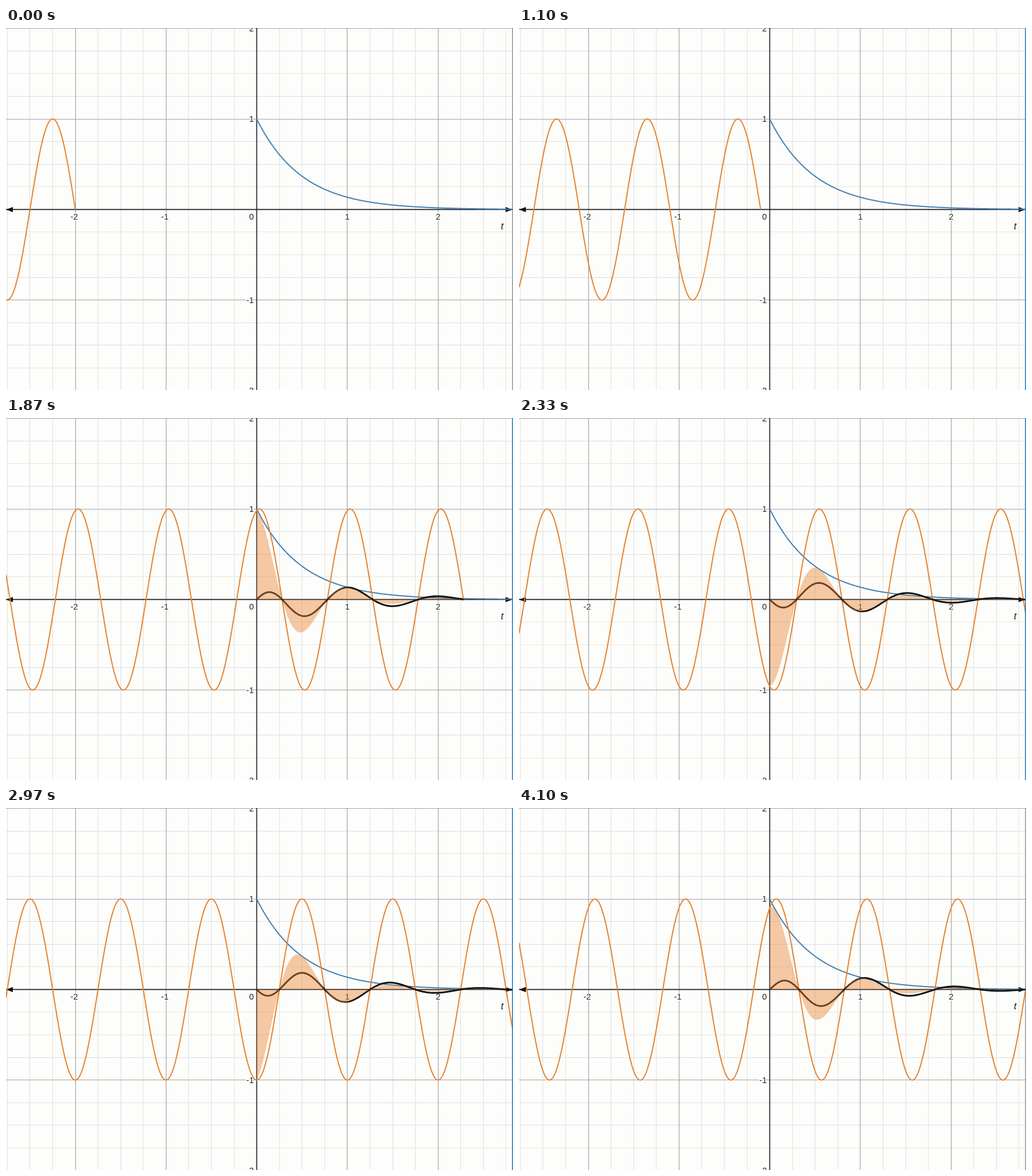
Recreate the animation shown at these times as an HTML page with a canvas. Size 885 by 633 pixels, loop 4.13 s.

```html
<!DOCTYPE html>
<html>
<head>
<meta charset="utf-8">
<style>
html, body { margin: 0; width: 885px; height: 633px; overflow: hidden; background: #fdfdfc; }
canvas { display: block; }
</style>
</head>
<body>
<canvas id="stage" width="885" height="633"></canvas>
<script>
const W = 885, H = 633, LOOP = 4130, STEPS = 124;
const X0 = 437.6, Y0 = 317.4, UNIT = 158.3;
const LEFT = -X0 / UNIT, RIGHT = (W - X0) / UNIT;
const ORANGE = '#e5822e';
const ctx = document.getElementById('stage').getContext('2d');

// [step, shift of the sine wave]
const KEYS = [[0, -2], [15, -2], [33, -0.1], [56, 2.28], [70, 3.797],
  [89, 5.75], [106, 7.698], [121, 9.322], [124, 9.322]];

const px = x => X0 + x * UNIT;
const py = y => Y0 - y * UNIT;

function shiftAt(step) {
  const i = KEYS.findIndex(k => k[0] > step);
  const [a, from] = KEYS[i - 1], [b, to] = KEYS[i];
  return from + (to - from) * (step - a) / (b - a);
}

function line(x1, y1, x2, y2, color, width = 1) {
  ctx.strokeStyle = color;
  ctx.lineWidth = width;
  ctx.beginPath();
  ctx.moveTo(x1, y1);
  ctx.lineTo(x2, y2);
  ctx.stroke();
}

function trace(f, a, b) {
  ctx.beginPath();
  for (let x = a; x < b; x += 0.006) ctx.lineTo(px(x), py(f(x)));
  ctx.lineTo(px(b), py(f(b)));
}

function curve(f, a, b, color, width) {
  if (b <= a) return;
  trace(f, a, b);
  ctx.strokeStyle = color;
  ctx.lineWidth = width;
  ctx.stroke();
}

function shade(f, a, b) {
  if (b <= a) return;
  trace(f, a, b);
  ctx.lineTo(px(b), Y0);
  ctx.lineTo(px(a), Y0);
  ctx.globalAlpha = 0.43;
  ctx.fillStyle = ORANGE;
  ctx.fill();
  ctx.globalAlpha = 1;
}

function label(text, x, y, align) {
  ctx.textAlign = align;
  ctx.strokeStyle = '#fdfdfc';
  ctx.lineWidth = 3;
  ctx.strokeText(text, x, y);
  ctx.fillStyle = '#222';
  ctx.fillText(text, x, y);
}

function arrow(tip, dir) {
  ctx.fillStyle = '#111';
  ctx.beginPath();
  ctx.moveTo(tip, Y0);
  ctx.lineTo(tip - 12 * dir, Y0 - 4.5);
  ctx.lineTo(tip - 12 * dir, Y0 + 4.5);
  ctx.fill();
}

function grid() {
  const snap = v => Math.floor(v) + 0.5;
  for (const major of [false, true]) {
    for (let i = -11; i <= 11; i++) {
      if ((i % 4 === 0) !== major) continue;
      const x = snap(px(i / 4)), y = snap(py(i / 4));
      line(x, 0, x, H, major ? '#969692' : i % 2 ? '#e0e0dc' : '#dcdce6');
      const warm = [1, -1, -2, 6, -7].includes(i);
      const minor = warm ? '#e7e8d2' : '#dadaea';
      line(0, y, W, y, !major ? minor : i === 4 ? '#a0a2b4' : '#a0a09c');
    }
  }
}

function axes() {
  line(0, Y0, W, Y0, '#181820', 1.6);
  line(X0, 0, X0, H, '#242432', 1.7);
  arrow(0, -1);
  arrow(884, 1);
  ctx.lineJoin = 'round';
  ctx.font = '14.5px "Liberation Sans", Arial, sans-serif';
  for (const n of [-2, -1, 1, 2]) {
    label(n, px(n) - (n < 0 ? 2 : 0), 334.5, 'center');
    label(n, 432.5, py(n) + 5, 'right');
  }
  label('0', 432.5, 334.5, 'right');
  ctx.font = 'italic 17px "Liberation Sans", Arial, sans-serif';
  label('t', 866, 352, 'center');
}

function draw(time) {
  const step = Math.min(STEPS - 1, Math.floor((time + 4) * STEPS / LOOP));
  const s = shiftAt(step), end = Math.min(s, RIGHT);
  const decay = t => Math.exp(-2 * t);
  const wave = t => Math.sin(2 * Math.PI * (s - t));

  ctx.fillStyle = '#fdfdfc';
  ctx.fillRect(0, 0, W, H);
  grid();
  axes();
  curve(decay, 0, RIGHT, '#427fae', 2);
  curve(wave, LEFT, end, ORANGE, 2);
  curve(t => t * decay(t) * wave(t), 0, end, '#111', 3);
  shade(t => decay(t) * wave(t), 0, end);

  const focused = step >= 16 && step < 121;
  line(884.2, 0, 884.2, H, focused ? '#2f84c8' : '#77777a', focused ? 1.8 : 1.2);
}

function tick() {
  draw(performance.now() % LOOP);
  requestAnimationFrame(tick);
}
tick();
</script>
</body>
</html>
```
